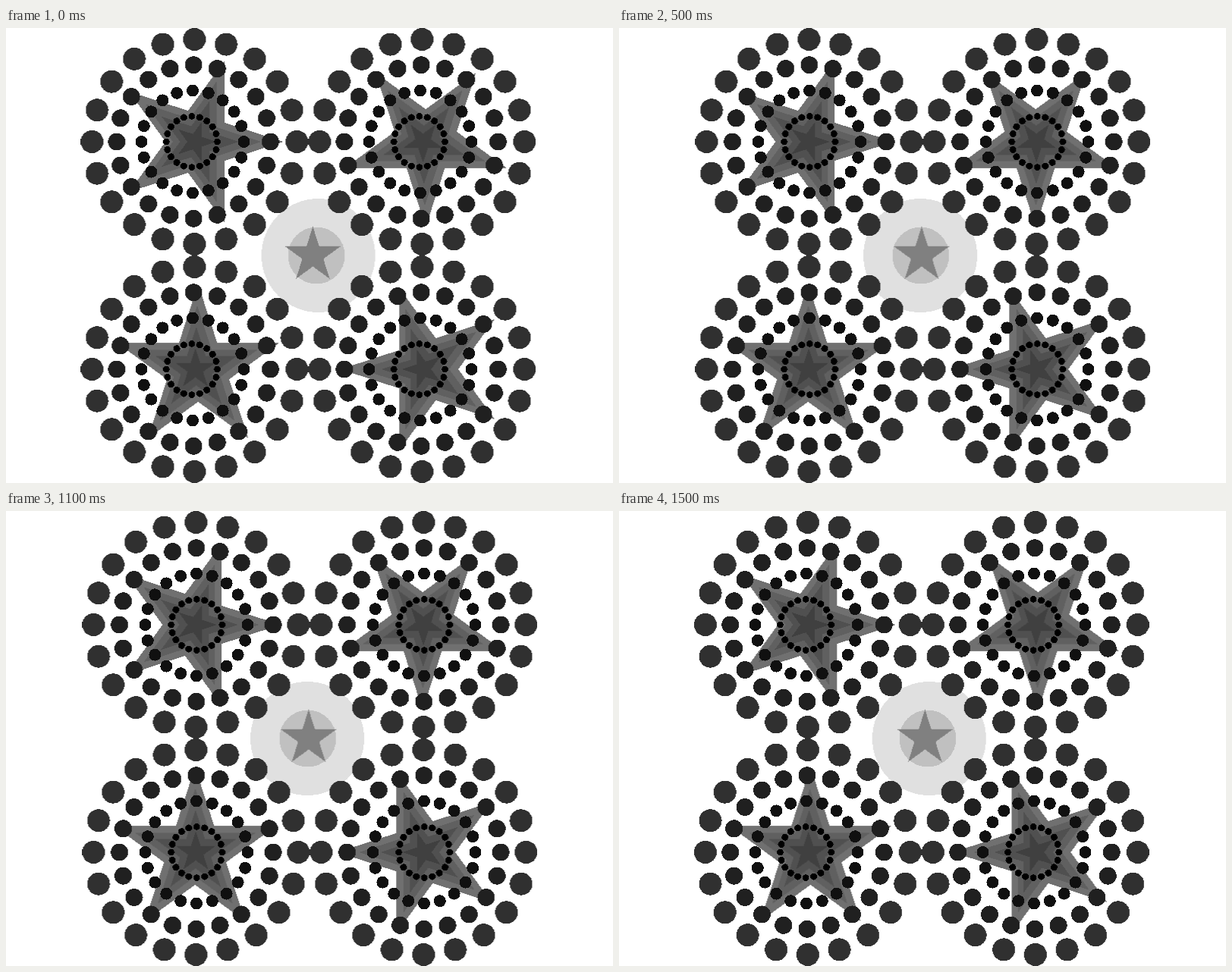
Animation, 800 px wide and 600 px high, one loop 1.6 s. Source, as an HTML page without scripts:

```html
<!DOCTYPE html>
<html lang="en">
<head>
<meta charset="utf-8">
<title>Swaying stars and dots</title>
<style>
  html, body { margin: 0; width: 100%; height: 100%; overflow: hidden; background: #fff; }
  svg { display: block; width: 800px; height: 600px; shape-rendering: crispEdges; }

  /* --level sets both the grey and the depth of a layer, --n its size. */
  .layer {
    --grey: calc(var(--level) * 16);
    --shift: calc(var(--level) * 1.2px - 5.2px);
    color: rgb(var(--grey), var(--grey), var(--grey));
    fill: currentColor;
    animation: sway 1.6s infinite;
  }
  @keyframes sway {
    0%, 100% { transform: translateX(var(--shift)); animation-timing-function: steps(8, end); }
    50% { transform: translateX(calc(var(--shift) * -1)); animation-timing-function: steps(8, end); }
  }

  .star { transform: scale(calc(var(--n) * .28125)); }
  .ring {
    r: calc(var(--n) * 33.75px);
    fill: none;
    stroke: currentColor;
    stroke-width: calc(var(--n) * 7px + 2px);
    stroke-linecap: round;
    stroke-dasharray: 0 1;
  }
</style>
</head>
<body>
<svg viewBox="0 0 800 600">
  <defs>
    <polygon id="star" points="100,0 -80.9,58.8 30.9,-95.1 30.9,95.1 -80.9,-58.8"/>
    <g id="sized-star"><use href="#star" class="star"/></g>
    <circle id="ring" class="ring" r="135" pathLength="20"/>
    <g id="stars">
      <use href="#sized-star" transform="translate(250 150)"/>
      <use href="#sized-star" transform="translate(550 150) rotate(90)"/>
      <use href="#sized-star" transform="translate(550 450) rotate(180)"/>
      <use href="#sized-star" transform="translate(250 450) rotate(270)"/>
    </g>
    <g id="rings">
      <use href="#ring" x="250" y="150"/>
      <use href="#ring" x="550" y="150"/>
      <use href="#ring" x="550" y="450"/>
      <use href="#ring" x="250" y="450"/>
    </g>
  </defs>

  <g class="layer" style="--level: 14"><circle cx="400" cy="300" r="75"/></g>
  <g class="layer" style="--level: 12"><circle cx="400" cy="300" r="37.5"/></g>
  <g class="layer" style="--level: 8"><use href="#star" transform="translate(400 300) rotate(-90) scale(.38)"/></g>

  <g class="layer" style="--level: 7; --n: 4"><use href="#stars"/></g>
  <g class="layer" style="--level: 6; --n: 3"><use href="#stars"/></g>
  <g class="layer" style="--level: 5; --n: 2"><use href="#stars"/></g>
  <g class="layer" style="--level: 4; --n: 1"><use href="#stars"/></g>

  <g class="layer" style="--level: 3; --n: 4"><use href="#rings"/></g>
  <g class="layer" style="--level: 2; --n: 3"><use href="#rings"/></g>
  <g class="layer" style="--level: 1; --n: 2"><use href="#rings"/></g>
  <g class="layer" style="--level: 0; --n: 1"><use href="#rings"/></g>
</svg>
</body>
</html>
```
